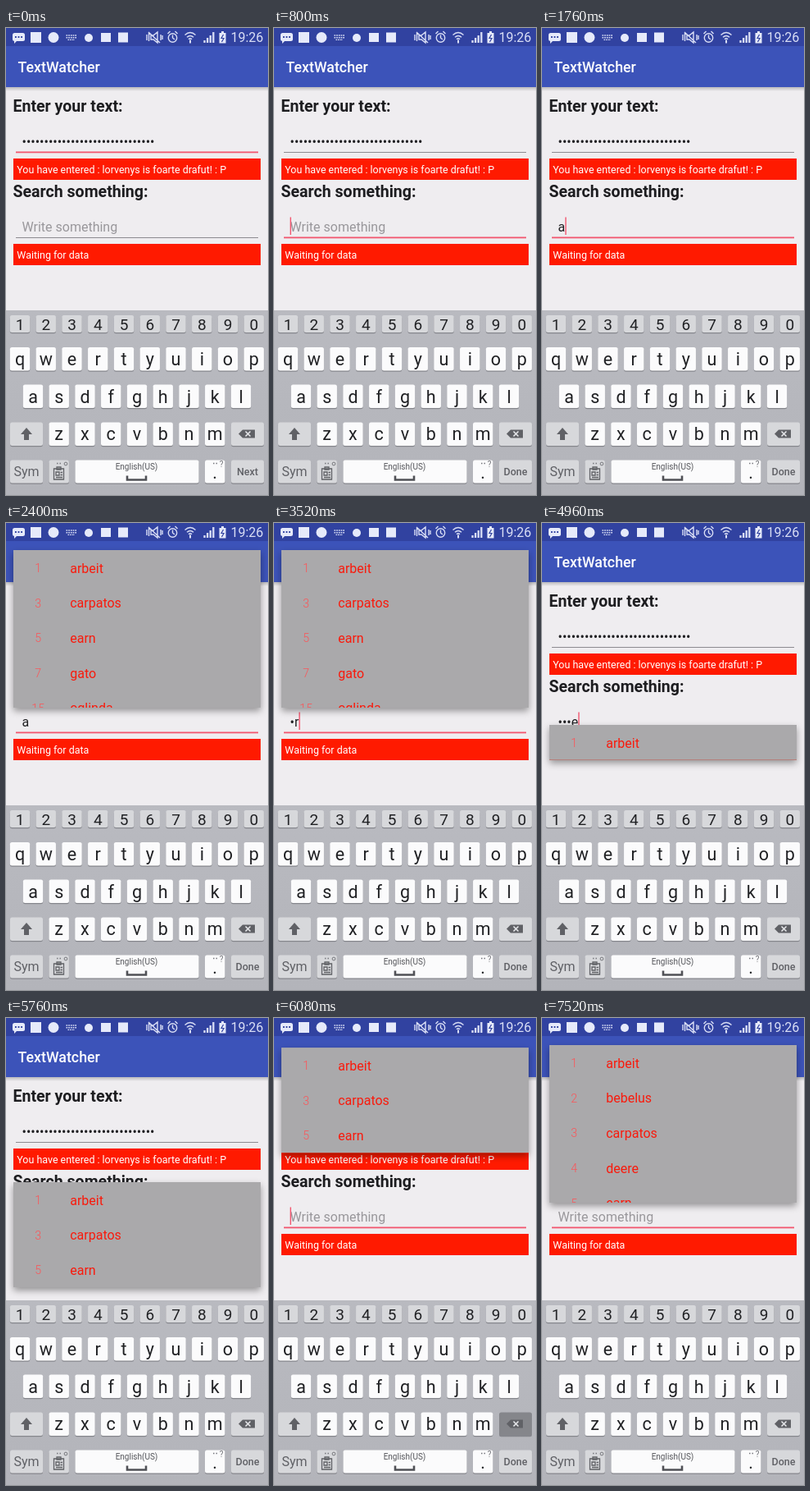
Recreate the animation shown at these times as an HTML page. Size 320x569 px, loop 8 s.

```html
<!DOCTYPE html>
<html lang="en">
<head>
<meta charset="utf-8">
<title>TextWatcher</title>
<style>
  html, body { margin: 0; width: 100%; height: 100%; overflow: hidden; background: #efedf0; }
  #stage { display: block; width: 100vw; height: 100vh; }
  text { font-family: Roboto, Arial, sans-serif; white-space: pre; }
  .title { font-size: 17.8px; font-weight: 500; fill: #fff; }
  .head { font-size: 19.56px; font-weight: 700; fill: #1d1d20; }
  .note { font-size: 12.44px; fill: #fff; }
  .input { font-size: 16px; fill: #1f1f22; }
  .hint { font-size: 16px; fill: #99979b; }
  .item { font-size: 16px; fill: #f91a0c; }
  .num { font-size: 14.2px; font-weight: 300; fill: #fb5558; text-anchor: middle; }
  .key { font-size: 21.5px; fill: #202124; text-anchor: middle; }
  .digit { font-size: 19px; }
  .small { font-size: 12.5px; font-weight: 500; fill: #606166; }
  .status { fill: none; stroke: #d9def5; stroke-width: 1.4; }
  .solid { fill: #e6eafa; stroke: none; }
</style>
</head>
<body>
<svg id="stage" viewBox="0 0 320 569" preserveAspectRatio="none">
  <defs>
    <linearGradient id="board" x2="0" y2="1">
      <stop stop-color="#b9bac0"/><stop offset="1" stop-color="#b3b4ba"/>
    </linearGradient>
    <linearGradient id="barShade" x2="0" y2="1">
      <stop stop-color="#000" stop-opacity=".22"/><stop offset="1" stop-color="#000" stop-opacity="0"/>
    </linearGradient>
    <filter id="shade" x="-10%" y="-40%" width="120%" height="200%">
      <feDropShadow dx="0" dy="4" stdDeviation="4.5" flood-opacity=".38"/>
    </filter>
  </defs>

  <rect width="320" height="569" fill="#efedf0"/>
  <rect y="72" width="320" height="5" fill="url(#barShade)"/>
  <rect width="320" height="72" fill="#3c53b9"/>
  <rect width="320" height="22" fill="#3142a0"/>
  <text class="title" x="14.5" y="54">TextWatcher</text>

  <g class="status">
    <rect class="solid" x="8" y="6" width="15" height="10" rx="2.5"/>
    <path class="solid" d="M10 15v4l4-4z"/>
    <path d="M11 11h1.8m1.8 0h1.8m1.8 0h1.8" stroke="#3142a0" stroke-width="1.8"/>
    <rect class="solid" x="30" y="5" width="13" height="13"/>
    <circle class="solid" cx="58" cy="11.5" r="6.5"/>
    <path d="M73.500 9h12.500M73.500 11.700h12.500M75.500 14.400h8.500" stroke-dasharray="1.7 1"/>
    <circle class="solid" cx="101" cy="12" r="5"/>
    <rect class="solid" x="116" y="6" width="12" height="11"/>
    <rect class="solid" x="137" y="5.500" width="12" height="12"/>
    <path d="M172 8v7m2.500-9v10M189 8v7m2-6v5M177 9h3l5-4v13l-5-4h-3zM174 5l14 13"/>
    <circle cx="203.500" cy="12" r="5.200"/>
    <path d="M203.500 8.500V12l2.500 2M197.500 7l3-3m6 0l3 3"/>
    <path d="M218.500 8.500q6.500-6 13 0M221 11.200q4-3.600 8 0M223 13.700q2-1.700 4 0"/>
    <path d="M225 14.500v4" stroke-width="2"/>
    <path d="M242.500 18v-3m3.600 3v-6m3.600 6V9m3.600 9V5" stroke-width="2.300"/>
    <path class="solid" d="M260.500 6h2.500V4h3v2h2.500v12.500h-8z"/>
    <path d="M265.500 8l-2.500 4.500h3L263.500 17" stroke="#3142a0" stroke-width="1.200"/>
  </g>
  <text x="274.500" y="17.300" font-size="16" fill="#d9def5">19:26</text>

  <text class="head" x="8.500" y="102">Enter your text:</text>
  <text class="input" id="first" x="19.500" y="143.700"></text>
  <rect id="line1" x="12" width="296"/>
  <rect x="9" y="159" width="302" height="26" fill="#ff1a00"/>
  <text class="note" x="13.300" y="176.500">You have entered : lorvenys is foarte drafut! : P</text>

  <text class="head" x="8.500" y="205.500">Search something:</text>
  <text class="hint" id="hint" x="19.500" y="247.700">Write something</text>
  <text class="input" id="second" x="19.500" y="247.700"></text>
  <rect id="line2" x="12" width="296"/>
  <rect id="caret" y="230.500" width="1.400" height="21.500" fill="#f2566f"/>
  <rect x="9" y="263" width="302" height="26" fill="#ff1a00"/>
  <text class="note" x="13.300" y="280.500">Waiting for data</text>

  <g id="popup">
    <rect id="panel" width="302" fill="#aaa9ab" filter="url(#shade)"/>
    <svg id="list" width="302" overflow="hidden"></svg>
  </g>

  <g id="keyboard"><rect y="344" width="320" height="225" fill="url(#board)"/></g>
</svg>

<script>
const LOOP = 8000, TICK = 160, ROW = 128 / 3;
const PINK = '#f2566f', GREY = '#8d8b90';
const $ = id => document.getElementById(id);

function add(parent, tag, attrs, text) {
  const el = document.createElementNS('http://www.w3.org/2000/svg', tag);
  for (const k in attrs) el.setAttribute(k, attrs[k]);
  if (text) el.textContent = text;
  return parent.appendChild(el);
}
function set(id, attrs) {
  for (const k in attrs) $(id).setAttribute(k, attrs[k]);
}

// Keyboard
const board = $('keyboard');
const keys = {};
function addKey(name, x, y, w, h, color) {
  add(board, 'rect', { x, y: y + 1.3, width: w, height: h, rx: 2.5, fill: '#86878d' });
  keys[name] = add(board, 'rect', { x, y, width: w, height: h, rx: 2.5, fill: color });
  keys[name].base = color;
}
function label(text, x, y, cls) {
  return add(board, 'text', { x, y, class: 'key ' + cls }, text);
}
function keyRow(chars, cx, y, h, color, cls, base) {
  [...chars].forEach((c, i) => {
    const x = cx + i * 31.75;
    addKey(c, x - 12.2, y, 24.4, h, color);
    label(c, x, base, cls);
  });
}
const LIGHT = '#fbfbfc', SHADED = '#d7d8db';
keyRow('1234567890', 17, 350, 21, SHADED, 'digit', 367.5);
keyRow('qwertyuiop', 17, 389, 28.5, LIGHT, '', 410.5);
keyRow('asdfghjkl', 33, 434.5, 28.5, LIGHT, '', 456.5);
keyRow('zxcvbnm', 64.7, 480.5, 28.5, LIGHT, '', 502);
addKey('shift', 5, 480.5, 40, 28.5, SHADED);
addKey('back', 275, 480.5, 40, 28.5, SHADED);
addKey('sym', 5, 526.5, 40, 28, SHADED);
addKey('clip', 52.5, 526.5, 24.4, 28, SHADED);
addKey('space', 84.5, 526.5, 151, 28, LIGHT);
addKey('dot', 243, 526.5, 24.4, 28, LIGHT);
addKey('enter', 275, 526.5, 40, 28, SHADED);
label('Sym', 25, 546, '').style.cssText = 'font-size:16px;fill:#606166';
label('English(US)', 159.5, 538, '').style.cssText = 'font-size:10px;fill:#55565b';
label('.', 255, 549, '');
label('?', 263, 535, '').style.cssText = 'font-size:10px;fill:#77787d';
const enter = label('Next', 295, 544.5, 'small');
const ink = (d, attrs) => add(board, 'path', { d, fill: '#606166', ...attrs });
ink('M25 487l7 8h-4v7h-6v-7h-4z');
ink('M284 494.500l5-5h15v10h-15z');
ink('M292.500 491.500l6 6m0-6l-6 6', { stroke: '#e4e5e8', 'stroke-width': 1.6 });
ink('M148 545.500v5h23v-5', { fill: 'none', stroke: '#505156', 'stroke-width': 2.6 });
ink('M58.500 537h12v13h-12zM62 535h5v3h-5zM61 541h4v4h-4zM66.500 541.500h2.500m-2.500 3h2.500m-8 3h8',
  { fill: 'none', stroke: '#606166', 'stroke-width': 1.3 });
ink('M62 530.500h1.500m2 0h1.500m186 0h1.500m2 0h1.500', { stroke: '#77787d', 'stroke-width': 1.5 });
add(board, 'circle', { cx: 73, cy: 531, r: 1.9, fill: 'none', stroke: '#77787d' });

// Suggestions
const words = { 1: 'arbeit', 2: 'bebelus', 3: 'carpatos', 4: 'deere', 5: 'earn', 7: 'gato', 15: 'oglinda' };
const lists = { all: [1, 2, 3, 4, 5], a: [1, 3, 5, 7, 15], ar: [1, 3, 5], arb: [1] };
const groups = {};
for (const name in lists) {
  groups[name] = add($('list'), 'g', {});
  lists[name].forEach((n, i) => {
    add(groups[name], 'text', { x: 30.2, y: i * ROW + 27, class: 'num' }, String(n));
    add(groups[name], 'text', { x: 69.2, y: i * ROW + 27.6, class: 'item' }, words[n]);
  });
}

// State changes over the loop
const script = [
  [0, { focus: 1, action: 'Next', text: '', caret: 0, list: '', alpha: 1, press: '' }],
  [160, { focus: 2 }],
  [320, { caret: 1 }],
  [480, { action: 'Done' }],
  [1280, { caret: 0 }],
  [1440, { press: 'a' }],
  [1600, { text: 'a', caret: 1, press: '' }],
  [1920, { list: 'a', alpha: .6 }],
  [2080, { alpha: 1 }],
  [2400, { caret: 0 }],
  [2720, { press: 'r' }],
  [2880, { text: '•r', caret: 1 }],
  [3040, { press: '' }],
  [3680, { text: '••b', list: 'ar', press: 'b' }],
  [3840, { list: 'arb', press: 'e' }],
  [4000, { text: '•••e', press: '' }],
  [4480, { caret: 0 }],
  [4960, { caret: 1 }],
  [5440, { press: 'back' }],
  [5600, { text: '•••', press: '' }],
  [5760, { text: '••', list: 'ar' }],
  [5920, { text: '•', press: 'back' }],
  [6080, { text: '' }],
  [6240, { list: 'all' }],
  [6400, { press: '' }],
  [6560, { caret: 0 }],
  [7040, { caret: 1 }],
  [7520, { caret: 0 }]
];

function ease(t, start, span) {
  const p = Math.min(1, Math.max(0, (t - start) / span));
  return (1 - Math.cos(Math.PI * p)) / 2;
}

$('first').textContent = '•'.repeat(30);

function underline(id, y, on) {
  set(id, { y: on ? y - .5 : y, height: on ? 1.8 : 1, fill: on ? PINK : GREY });
}

function draw(t) {
  const s = {};
  for (const [at, change] of script) if (at <= t) Object.assign(s, change);

  underline('line1', 151, s.focus === 1);
  underline('line2', 255, s.focus === 2);
  $('second').textContent = s.text;
  $('hint').style.display = s.text ? 'none' : '';
  set('caret', { x: 19.6 + (s.text ? $('second').getComputedTextLength() : 0), opacity: s.caret });
  enter.textContent = s.action;

  for (const name in keys) {
    const dark = name === 'back' ? '#85868b' : '#c3c5ca';
    keys[name].setAttribute('fill', name === s.press ? dark : keys[name].base);
  }

  $('popup').style.display = s.list ? '' : 'none';
  if (!s.list) return;
  const top = 33 + 213 * (ease(t, 3640, 520) - ease(t, 5600, 520));
  const height = Math.min(192, lists[s.list].length * ROW);
  set('popup', { transform: `translate(9 ${top})`, opacity: s.alpha });
  set('panel', { height });
  set('list', { height });
  for (const name in groups) groups[name].style.display = name === s.list ? '' : 'none';
}

let shown = -1;
const origin = performance.now();
function frame() {
  const t = Math.floor((performance.now() - origin) % LOOP / TICK) * TICK;
  if (t !== shown) draw(shown = t);
  requestAnimationFrame(frame);
}
frame();
</script>
</body>
</html>
```
